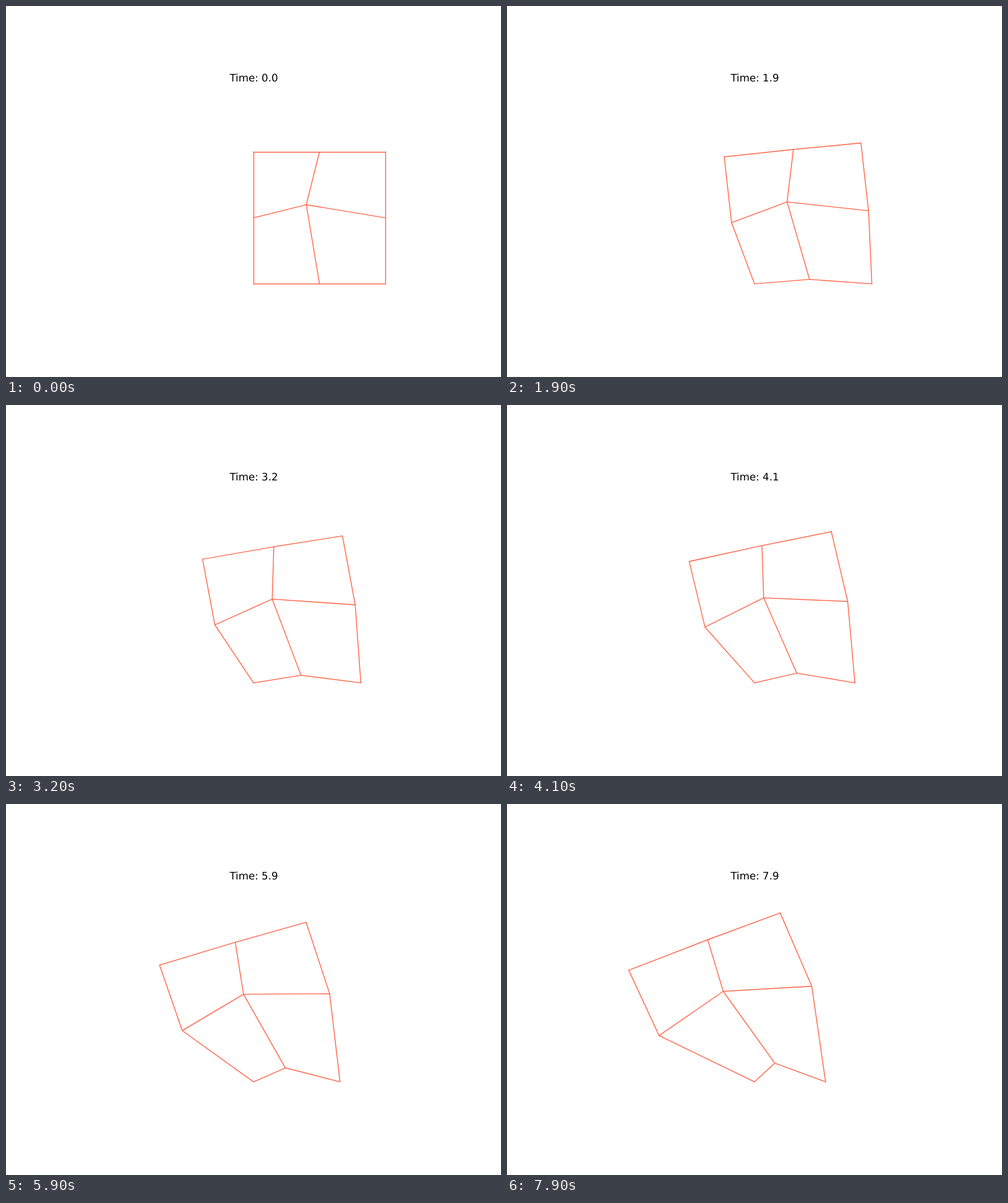
Recreate the animation shown at these times as an HTML page. Size 800 px wide and 600 px high, loop 8 s.

```html
<!DOCTYPE html>
<html lang="en">
<head>
<meta charset="utf-8">
<title>Moving mesh</title>
<style>
  html, body { margin: 0; width: 100%; height: 100%; overflow: hidden; background: #fff; }
  svg { display: block; }
  path { fill: none; stroke: #ff6347; stroke-width: 1.39; stroke-linecap: square; }
  text {
    font: 16.67px "DejaVu Sans", sans-serif;
    text-anchor: middle;
    text-rendering: geometricPrecision;
  }
</style>
</head>
<body>
<svg width="800" height="600" viewBox="0 0 800 600">
  <text id="label" x="400.5" y="122">Time: 0.0</text>
  <path id="mesh"/>
</svg>
<script>
  const LOOP = 8000, STEP = 100;
  const SIDE = 3, CELL = 640 / 6;
  const LEFT = 400, BOTTOM = 449.33;

  // Constant drift of each node in pixels per second, rows from the bottom up
  const DRIFT = [
    [0, 0],         [-9.36, -3.82],  [-12.46, 0],
    [-19.52, 4.03], [-17.2, -2.32],  [-15.29, -6.07],
    [-25.73, 4.16], [-23.07, -2.09], [-21.75, -7.58]
  ];

  const label = document.getElementById("label");
  const mesh = document.getElementById("mesh");

  // Regular grid, with the middle node pushed up and to the left
  const nodes = DRIFT.map(([vx, vy], i) => {
    const push = i === 4 ? CELL / 5 : 0;
    return {
      x: LEFT + i % SIDE * CELL - push,
      y: BOTTOM - Math.floor(i / SIDE) * CELL - push,
      vx, vy
    };
  });

  const edges = [];
  nodes.forEach((_, i) => {
    if (i % SIDE < SIDE - 1) edges.push([i, i + 1]);
    if (i + SIDE < nodes.length) edges.push([i, i + SIDE]);
  });

  const snap = v => Math.floor(v + 0.01) + 0.5;

  // Upright and level edges sit on whole pixels
  function line(a, b) {
    const place = p => [
      a.x === b.x ? snap(p.x) : p.x,
      a.y === b.y ? snap(p.y) : p.y
    ].map(v => v.toFixed(2)).join(" ");
    return "M" + place(a) + "L" + place(b);
  }

  function draw(t) {
    const points = nodes.map(n => ({ x: n.x + n.vx * t, y: n.y + n.vy * t }));
    mesh.setAttribute("d", edges.map(([a, b]) => line(points[a], points[b])).join(""));
    label.textContent = "Time: " + t.toFixed(1);
  }

  const start = performance.now();
  let shown = -1;

  function tick() {
    const step = Math.floor((performance.now() - start) % LOOP / STEP);
    if (step !== shown) draw((shown = step) / 10);
    requestAnimationFrame(tick);
  }
  tick();
</script>
</body>
</html>
```
